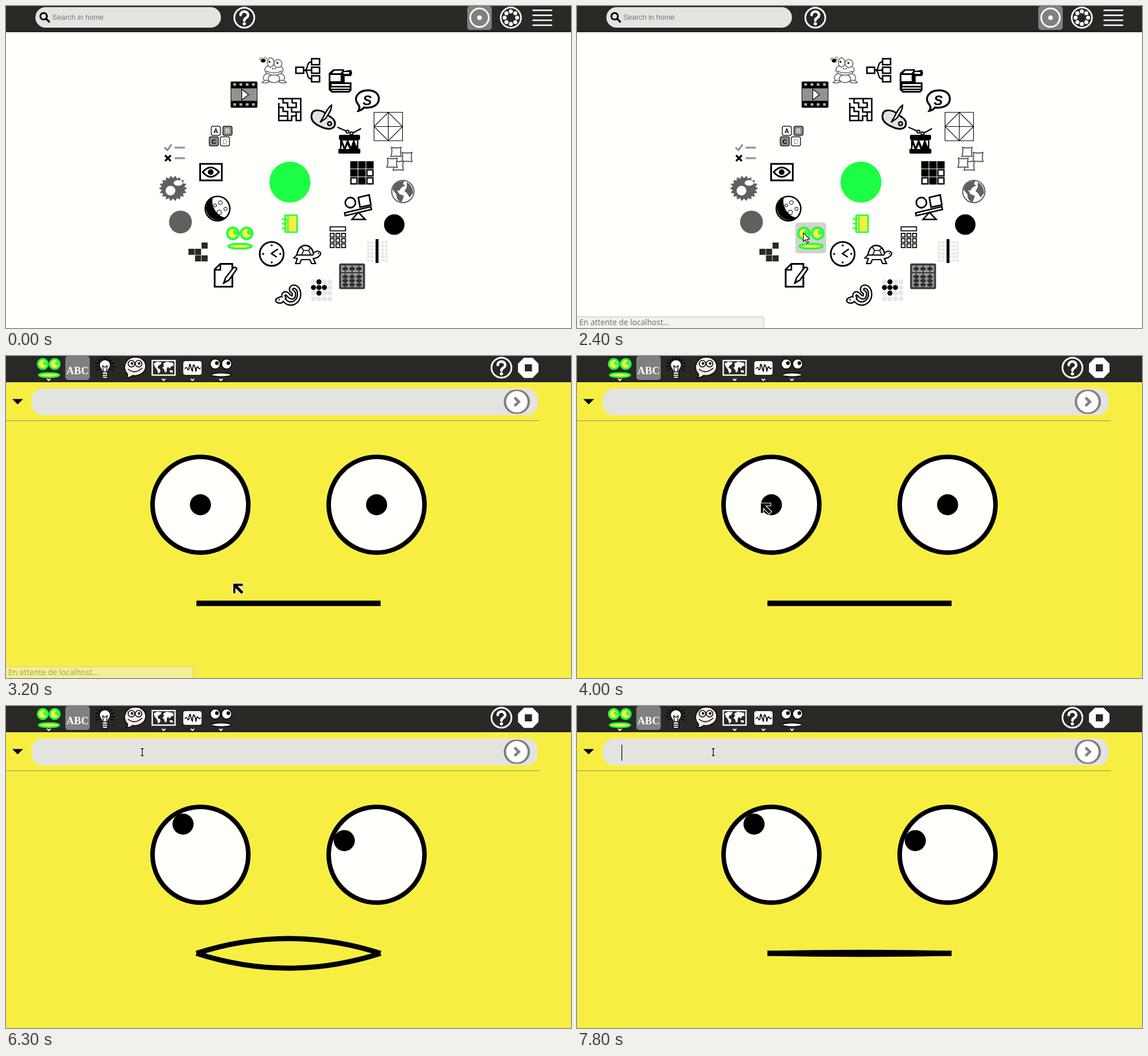
These frames come from a looping animation (991 px wide and 565 px high, 8 s). An HTML page:

```html
<!DOCTYPE html>
<html lang="en">
<head>
<meta charset="utf-8">
<title>Talking face</title>
<style>
html, body { margin: 0; width: 100%; height: 100%; overflow: hidden; background: #fffffc; }
svg { display: block; width: 991px; height: 565px; }
text { font-family: "Liberation Sans", Arial, sans-serif; }
</style>
</head>
<body>
<svg id="stage" viewBox="0 0 991 565" width="991" height="565"></svg>
<script>
const BAR = '#282824', PAPER = '#fffffc', GREY = '#808080', FIELD = '#e3e4e0';
const YELLOW = '#f8ee42', GREEN = '#1cff44', DIM = '#606060', FAINT = '#e8e8e6';

// Shape helpers: fill, stroke, stroke width
const ink = (f = 'none', s = 'none', w = 3) =>
  `fill="${f}" stroke="${s}" stroke-width="${w}"`;
const rect = (x, y, w, h, r, ...p) =>
  `<rect x="${x}" y="${y}" width="${w}" height="${h}" rx="${r}" ${ink(...p)}/>`;
const oval = (x, y, rx, ry, ...p) =>
  `<ellipse cx="${x}" cy="${y}" rx="${rx}" ry="${ry}" ${ink(...p)}/>`;
const disc = (x, y, r, ...p) => oval(x, y, r, r, ...p);
const path = (d, ...p) => `<path d="${d}" ${ink(...p)}/>`;
const line = (d, s = '#000', w = 3) =>
  `<path d="${d}" ${ink('none', s, w)} stroke-linecap="round" stroke-linejoin="round"/>`;
const text = (s, x, y, size, fill, extra = '') =>
  `<text x="${x}" y="${y}" font-size="${size}" fill="${fill}" ${extra}>${s}</text>`;
const group = (id, body, extra = '') => `<g id="${id}" ${extra}>${body}</g>`;
const move = (x, y, body, s = 1) =>
  `<g transform="translate(${x} ${y}) scale(${s})">${body}</g>`;
const repeat = (n, f) => Array.from({ length: n }, (_, i) => f(i)).join('');
const grid = (cols, rows, f) => repeat(rows, r => repeat(cols, c => f(c, r)));

const help = x => disc(x, 20.5, 17.5, 'none', '#fff', 3) + move(x, 20.5,
  line('M-6.5 -4.8a6.5 6 0 1 1 9.6 5.3c-2.2 1.2 -3.1 2.2 -3.1 4.6', '#fff', 4.6) +
  disc(0, 10.8, 2.8, '#fff'));

const face = (x, y, s, fill, edge) => move(x, y,
  [-12, 12].map(dx => disc(dx, -8, 10, fill, edge, 4) +
    disc(dx + 5, -10, 4.2, edge) + disc(dx + 6, -11, 1.3, fill)).join('') +
  oval(0.5, 14.5, 20.5, 4.2, fill, edge, 3.2), s);

function homeBar() {
  const dots = repeat(8, i => {
    const a = i * Math.PI / 4;
    return disc(885.5 + 11 * Math.cos(a), 20.5 + 11 * Math.sin(a), 3.5, '#fff');
  });
  return rect(0, 0, 991, 46, 0, BAR) + rect(0, 43, 991, 3, 0, '#262123') +
    rect(51.5, 2, 325.5, 36, 18, FIELD) +
    disc(66, 18, 5.8, 'none', '#000', 3) + line('M70.5 22.5L75.5 27.5', '#000', 3.4) +
    text('Search in home', 81, 24, 12.9, '#757575') + help(418) +
    rect(809, 0, 43, 42, 5, GREY) + disc(830.5, 20.5, 16.3, 'none', '#fff', 3) +
    disc(830.5, 20.5, 4, '#fff') + disc(885.5, 20.5, 17.8, 'none', '#fff', 2.8) + dots +
    line('M924.5 7.5H957M924.5 16.2H957M924.5 25H957M924.5 33.7H957', '#fff', 2.6);
}

function frog() {
  return disc(447.5, 93, 2.3, '#fff', '#444', 1) + disc(454.5, 92, 2.3, '#fff', '#444', 1) +
    oval(451, 96, 4, 3.2, '#000') +
    oval(470, 127.5, 10, 7, '#fff', DIM, 1.5) +
    path('M460 118c-9 2 -11 9 -6 13M480 118c9 2 11 9 6 13', 'none', DIM, 1.5) +
    path('M462 133c-4 -5 -10 -2 -13 1c4 2 9 1 13 -1zM478 133c4 -5 11 -2 14 1c-5 2 -10 1 -14 -1z', '#fff', DIM, 1.4) +
    oval(470, 112, 16, 9.5, '#fff', DIM, 1.5) +
    oval(464, 99, 5.8, 8.2, '#fff', DIM, 1.5) + disc(477, 101, 7, '#fff', DIM, 1.5) +
    disc(462, 98, 1.7, '#000') + disc(476, 100, 1.7, '#000') +
    disc(468, 110, 1.1, '#000') + disc(472, 110, 1.1, '#000') +
    path('M456 114q14 7 28 0', 'none', DIM, 1.4);
}

function topIcons() {
  const flow = rect(508.5, 107.5, 13.5, 10.5, 0, PAPER, '#000', 2.6) +
    [92.5, 107.5, 122.5].map(y => rect(536, y, 14, 10.5, 0, PAPER, '#000', 2.6)).join('') +
    path('M522 112.7H536M524 112.7C531 111 526 98 536 98M524 112.7C531 114 526 128 536 128', 'none', '#000', 2.4);
  const film = rect(394, 132.5, 47, 46, 2, '#000') +
    rect(394.5, 144, 46, 23, 0, '#929292', '#000', 1) +
    grid(4, 2, (c, r) => rect(398.5 + c * 11, 135.5 + r * 35, 5, 4.5, 1, '#aaa')) +
    path('M413.5 146V165L425.5 155.5Z', '#fff', '#000', 1.3);
  const books = path('M566 118L574 111H593V114L605 112Q609 118 605 123H594V134H606V148L602 152H571L566 147Z', '#000') +
    path('M569 121H587V132H569ZM576 113.5H590L587 118H572ZM592 116H602V119H592Z', '#fff') +
    path('M571 137H603V140H571ZM570 143H603V145H570ZM572 147.5H602V149H572Z', '#fff');
  const bubble = path('M618 184Q622 178 618 173C608 162 617 148 635 148C648 148 654 155 654 163C654 175 640 180 628 178Q624 183 618 184Z', PAPER, '#000', 3.4) +
    text('S', 633.5, 174, 24, '#000', 'text-anchor="middle" font-weight="bold" font-style="italic"');
  const maze = path('M477 162.5H517V201H509V193H501V201H478.5V170M478.5 193H494V185H486V178H478M486 162V170H494V178H509V170H501M502 162V170M517 186H501V178M509 193V186M494 186V201', 'none', '#000', 2.6);
  const palette = path('M536 191C538 179 554 183 560 188C566 194 578 197 577 207C576 218 562 217 553 212C543 208 534 201 536 191Z', '#e2e2e0', '#000', 3) +
    disc(567.5, 206.5, 3.2, PAPER, '#000', 2.6) +
    path('M571 174C566 177 559 189 557 194L551 204L561 197C565 190 572 182 571 174Z', PAPER, '#000', 2.4);
  const kite = path('M645.5 186.5H695.5V236.5H645.5ZM645.5 211.5H695.5M670.5 186.5V236.5M645.5 211.5L670.5 186.5L695.5 211.5L670.5 236.5Z', 'none', '#000', 1.1);
  const drum = rect(584, 226, 37, 9, 2, '#000') + rect(583, 250.5, 38.5, 8.5, 2, '#000') +
    path('M586 233H618V252H586Z', '#000') +
    path('M590 236H598L594 247ZM600.5 236H609L605 247ZM611 236H616L615 247ZM589 243L592 251H588ZM599 243L602.5 251H596Z', PAPER) +
    line('M582 213L598 220M622 215.5L608 223', '#000', 2.2) +
    disc(599, 220.5, 2.6, PAPER, '#000', 2) + disc(606, 223.5, 2.6, PAPER, '#000', 2);
  return frog() + flow + film + books + bubble + maze + palette + kite + drum;
}

function leftIcons() {
  const block = (ch, x, y, f, ink2, w) => rect(x, y, 16, 16, 3, f, '#222', 1.5) +
    text(ch, x + 8, y + 12, 11, ink2, `text-anchor="middle" font-weight="${w}"`);
  const letters = block('A', 360, 211, PAPER, '#000', 700) + block('B', 380.5, 211, '#8a8a8a', '#eee', 700) +
    block('C', 356.5, 229.5, '#8a8a8a', '#000', 700) + block('D', 376, 229.5, PAPER, '#888', 400);
  const list = path('M278 248L283 253L290.5 243', 'none', '#8a8a8a', 3) +
    line('M297 248.5H312.5M297 267H312.5', '#999', 3.4) +
    path('M279 262L289 272M289 262L279 272', 'none', '#000', 3.4);
  const eye = rect(340.5, 277, 38, 29, 0, PAPER, '#000', 3) +
    path('M345 291.5Q359 275 373.5 291.5Q359 308 345 291.5Z', PAPER, '#000', 2.8) + disc(359, 291.5, 5, '#000');
  const star = 'M' + Array.from({ length: 36 }, (_, i) => {
    const a = i * Math.PI / 18, r = i % 2 ? 0.8 : 1;
    return `${(293 + 25 * r * Math.cos(a)).toFixed(1)} ${(320 + 22.5 * r * Math.sin(a)).toFixed(1)}`;
  }).join('L') + 'Z';
  const burst = path(star, DIM) + oval(302, 310.5, 8, 5, PAPER) + disc(288.5, 324, 8.5, PAPER);
  const moon = disc(371, 355.5, 21.5, PAPER, '#000', 2.6) +
    path('M363 335A21.5 21.5 0 1 0 386 371C372 371 358 352 363 335Z', '#000') +
    disc(376, 345, 3.4, 'none', '#000', 1) + disc(385, 356, 3, 'none', '#000', 1) +
    disc(367, 350, 2.6, '#fff', '#000', 1) + disc(374, 362, 4, '#fff', '#000', 1);
  const bricks = [[343, 415], [320, 426], [331.5, 426], [331.5, 437.5], [343, 437.5]]
    .map(([x, y]) => rect(x, y, 10.7, 10.7, 0, BAR)).join('');
  const note = path('M366 462L376 452.5H397V492.5H366Z', PAPER, '#000', 3) +
    path('M376 452V463H366', 'none', '#000', 2.6) +
    path('M382 486L385 477L399 459Q404 457 404.5 462L391 481Z', PAPER, '#000', 2.6) + path('M381 488L383 481L388 484Z', '#000');
  return letters + list + eye + burst + moon + disc(306, 379, 20, DIM) + bricks + note;
}

function rightIcons() {
  const tiles = grid(3, 3, (c, r) => rect(605 + c * 14, 273.5 + r * 14, 10.6, 10.6, 0,
    'BBBBBWWBW'[r * 3 + c] === 'B' ? '#000' : PAPER, '#000', 2.4));
  const sheets = [[676, 248], [695, 257], [680, 272], [669, 267]].map(([x, y]) =>
    move(x, y, path('M0 0Q8 2 17 0Q15 8 17 16Q9 15 -1 16Q2 8 0 0Z', PAPER, DIM, 2))).join('');
  const globe = disc(696, 325.5, 19.5, PAPER, DIM, 2) +
    path('M681 314Q688 306 699 307L696 312L700 315L693 319L690 324L686 323L690 330L698 333L694 344Q684 341 685 331L678 322ZM703 309Q714 316 714 328L708 336L703 328L699 325L703 318Z', DIM);
  const scale = path('M594 363L640 352L641 357L595 368Z', PAPER, '#000', 2.6) +
    disc(604, 345, 9, PAPER, '#000', 2.8) +
    path('M618 336L637 331.5L640 349L621 353Z', PAPER, '#000', 2.8) + path('M618 362L607 374.5H630Z', PAPER, '#000', 2.6);
  const calc = rect(568.5, 387.5, 27, 7, 0, PAPER, '#000', 1.8) +
    grid(3, 3, (c, r) => rect(568.8 + c * 10, 399 + r * 9.2, 6.6, 6.4, 0, PAPER, '#000', 1.8));
  const bars = grid(6, 6, (c, r) => disc(635.5 + c * 6.3, 415 + r * 6.3, 2.6, FAINT)) + rect(648.3, 409, 5, 42, 0, '#000');
  const abacus = rect(586, 453.5, 42, 41.5, 1, '#999', '#3c3c3a', 3.5) +
    path('M587 468H628M595 454V494M607 454V494M619 454V494', 'none', '#3c3c3a', 1.8) +
    grid(3, 4, (c, r) => oval(595 + c * 12, [461, 475, 482, 489][r], 5, 3.1, '#30302e'));
  return tiles + sheets + globe + scale + disc(681, 383.5, 18, '#000') + calc + bars + abacus;
}

function lowIcons() {
  const journal = rect(489.5, 367, 21, 30, 1, YELLOW, GREEN, 2.6) +
    path('M494.5 367V397', 'none', GREEN, 2) + line('M484.5 374H491M484.5 382H491M484.5 390H491', GREEN, 2.4);
  const clock = disc(466, 435, 21, PAPER, '#000', 3) + line('M476 427L465.5 434.5L474 440', '#000', 2.6) +
    [[466, 420], [466, 450], [451, 435], [481, 435]].map(([x, y]) => disc(x, y, 1.8, '#000')).join('');
  const turtle = path('M510 438Q513 420 525 420Q538 421 540 438Z', PAPER, '#000', 2.4) +
    path('M518 423L522 429H531L534 424M522 429L518 438M531 429L535 438', 'none', '#000', 1.7) +
    path('M538 437Q541 430 547 430Q554 432 551 437Q546 443 539 443L543 452H536L533 445H518L515 452H508L511 443L505 442L510 437Z', PAPER, '#000', 2.2) +
    disc(548, 434, 1.2, '#000');
  const curl = 'M478 516C484 508 488 518 494 521C505 525 515 516 514 504C513 490 499 490 500 498C501 503 506 500 505 507C504 514 499 512 494 506C489 501 484 507 488 512';
  const snake = line(curl, '#000', 8) + oval(480, 516.5, 7, 4.8, PAPER, '#000', 2.4) +
    line(curl, PAPER, 3.4) + disc(479, 515.5, 1.2, '#000');
  const on = [1, 4, 5, 6, 9];
  const dots = grid(4, 4, (c, r) => disc(539.3 + c * 9.6, 484 + r * 9.9, 4.5,
    on.includes(r * 4 + c) ? '#000' : FAINT));
  return journal + clock + turtle + snake + dots;
}

const home = () => rect(0, 0, 991, 565, 0, PAPER) + homeBar() +
  rect(0, 0, 54, 54, 5, '#d2d2ce').replace('<rect', '<rect id="hover"') +
  topIcons() + leftIcons() + rightIcons() + lowIcons() +
  disc(498, 309, 36, GREEN) + face(410, 407, 1, YELLOW, GREEN);

function appBar() {
  const rays = repeat(11, i => {
    const a = (150 + i * 24) * Math.PI / 180, c = Math.cos(a), s = Math.sin(a);
    return line(`M${173.5 + 12 * c} ${17 + 12 * s}L${173.5 + 17 * c} ${17 + 16 * s}`, '#000', 1.5);
  });
  const bulb = rays + path('M169 28C169 23 164 22 164 16A9.5 9.5 0 0 1 183 16C183 22 178 23 178 28Z', '#fff', '#000', 1.4) +
    path('M171 28L169.5 17L173.5 20L177.5 17L176 28', 'none', '#000', 1.3) +
    rect(168.5, 28, 10, 11, 3, '#fff', '#000', 1.2) + path('M169 32H178M169 35.5H178', 'none', '#000', 1.4);
  const chat = path('M211 38Q215 34 212 30C203 20 210 2 227 2C238 2 245 9 245 18C245 30 232 36 222 34Q217 38 211 38Z', '#fbebe8', '#000', 1.6) +
    [220, 232.5].map(x => disc(x, 13.5, 5.7, '#fff', '#000', 1.6) + disc(x + 1, 13, 2.3, '#000')).join('') +
    path('M214 23Q226 33 239 21', 'none', '#000', 1.6);
  const map = rect(256.5, 8, 40, 25.5, 0, BAR, '#fff', 2.4) +
    path('M259 13L265 10L273 11L271 15L267 17L266 21L270 23L271 27L267 31L265 24L261 19ZM276 13L282 10L293 12L294 17L290 18L287 22L284 19L282 22L282 27L279 29L277 23L274 21L277 18ZM287 25L292 25L293 29L288 29Z', '#fff');
  const wave = rect(311, 9, 32, 24, 4, '#fff') +
    line('M314 22Q317 18 318 22T321 23Q322 9 324 18T327 27Q328 13 330 16T333 27Q335 16 337 20T341 21', '#000', 1.7);
  return rect(0, 0, 991, 46, 0, BAR) + rect(0, 43, 991, 3, 0, '#262123') +
    group('plain', face(75, 21, 0.87, '#fff', '#000')) + group('vivid', face(75, 21, 0.87, YELLOW, GREEN) +
      [75, 276.5, 327, 377].map(x => line(`M${x - 2.5} 40.5L${x} 43L${x + 2.5} 40.5`, '#fff', 1.8)).join('')) +
    rect(104, 0, 43, 42, 5, GREY) +
    text('ABC', 125.5, 32, 18.5, '#fff', 'text-anchor="middle" font-weight="bold" style="font-family:\'Liberation Serif\',serif"') +
    bulb + chat + map + wave +
    [367, 387].map(x => disc(x, 14, 8.8, '#fff', '#000', 1.6) + disc(x + 3, 12.5, 3.2, '#000')).join('') +
    oval(377.5, 33, 17, 3.2, '#fff', '#000', 1.4) + help(869) +
    path('M908.5 3H923.5L934 13.5V28L923.5 38.5H908.5L898 28V13.5Z', '#fff') + rect(910, 14.5, 12.5, 12.5, 0, BAR);
}

const app = () => rect(0, 0, 991, 565, 0, '#c0c0bc').replace('<rect', '<rect id="back"') + appBar() +
  path('M11 75.5H30L20.5 85Z', '#000') + rect(45, 57, 887.5, 47, 20, FIELD) +
  rect(873, 59, 46, 42.5, 21, GREY) + disc(896, 80.3, 18.8, '#fff') +
  path('M892 73L899.5 80.3L892 87.5', 'none', GREY, 4.6) +
  rect(0, 113, 936, 1, 0, '#8c8c84') + group('shine', rect(0, 114, 936, 1, 0, '#f4f4f0')) +
  group('caret', rect(78, 68, 1.2, 28, 0, '#000')) +
  group('head', [341, 650].map(x => disc(x, 261, 84, PAPER, '#000', 8)).join('') +
    group('pupilL', disc(0, 0, 18.5, '#000')) + group('pupilR', disc(0, 0, 18.5, '#000')) +
    group('lips', path('', 'none', '#000', 9) + path('', 'none', '#000', 9)));

document.getElementById('stage').innerHTML = group('home', home()) + group('app', app()) +
  group('status', path('M-1 566V545.5H325Q328 545.5 328 548.5V566Z', '#f0f0ec', '#b4b4b0', 1) +
    text('En attente de localhost…', 4, 560, 13.7, '#5c5c5a', 'style="font-family:\'Noto Sans\',\'Open Sans\',sans-serif"')) +
  group('pointer', path('M0 0V15L3.6 12L6.3 18L9 17L6.4 11.2H11Z', '#fff', '#000', 1.1)) +
  group('arrow', path('M1 1H19V6H10.5L20.5 16L16 20.5L6 10.5V19H1Z', '#000', '#fff', 1.2)) +
  group('beam', line('M-2 -6.3H2M0 -6.3V6.3M-2 6.3H2', '#fff', 3) + path('M-2.5 -6.3H2.5M0 -6.3V6.3M-2.5 6.3H2.5', 'none', '#000', 1.4));

const el = {};
document.querySelectorAll('[id]').forEach(e => el[e.id] = e);
const show = (id, on) => el[id].setAttribute('visibility', on ? 'inherit' : 'hidden');
const place = (id, x, y) => el[id].setAttribute('transform', `translate(${x} ${y})`);

const LOOP = 8000, OPEN = 2800, READY = 3100, LOOK = 4200;
// time, x, y
const mouse = [[0, -50, -50], [1400, 229, 187], [1500, 266, 258], [1600, 311, 326],
  [1900, 348, 354], [2000, 385, 384], [2100, 410, 404], [2300, 403, 400], [2400, 397, 398],
  [3600, 400, 408], [3700, 405, 386], [3800, 405, 357], [4000, 321, 257],
  [4200, 300, 211], [4300, 264, 133], [4400, 239, 81]];
// mouth opening every 100 ms, from TALK on
const TALK = 4500;
const voice = [6, 18, 27, 22, 12, 24, 27, 9, 19.5, 25, 12, 4, 4, 15, 24, 8, 20, 27, 26, 13, 21, 7, 7,
  28.5, 28.5, 14, 5, 5, 17, 24, 11, 20, 9, 1.8, 1.8];

const latest = (keys, t) => keys.filter(k => k[0] <= t).pop();

function pupil(id, cx, t, x, y) {
  const cy = 261, dx = x - cx, dy = y - cy;
  const k = t < LOOK ? 0 : Math.min(1, 61.8 / Math.hypot(dx, dy));
  place(id, cx + dx * k, cy + dy * k);
}

function draw(t) {
  const [, x, y] = latest(mouse, t), inApp = t >= OPEN, ready = t >= READY;
  show('home', !inApp);
  show('app', inApp);

  const overStar = t >= 1600 && t < 1900, overFace = t >= 2000;
  show('hover', !inApp && (overStar || overFace));
  place('hover', overStar ? 266 : 383, overStar ? 293 : 380);

  const glow = t < 2300 ? 0 : t < 2400 ? 0.4 : t < OPEN ? 0.85 : t < 3200 ? 1 : t < 3300 ? 0.5 : 0;
  el.status.setAttribute('opacity', glow);

  const typing = inApp && y > 57 && y < 104;
  show('pointer', !inApp);
  show('arrow', inApp && !typing);
  show('beam', typing);
  for (const id of ['pointer', 'arrow', 'beam']) place(id, x, y);

  el.back.setAttribute('fill', ready ? YELLOW : '#c0c0bc');
  show('plain', inApp && !ready);
  show('shine', inApp && !ready);
  show('vivid', ready);
  show('head', ready);
  show('caret', (t >= 5800 && t < 6100) || (t >= 6600 && t < 7100) || t >= 7600);

  pupil('pupilL', 341, t, x, y);
  pupil('pupilR', 650, t, x, y);
  const open = voice[Math.floor((t - TALK) / 100)] || 0;
  [-2, 2].forEach((k, i) => el.lips.children[i].setAttribute('d',
    `M334 434Q495.5 ${434 + k * open} 657 434`));
}

const start = performance.now();
function tick() {
  draw((performance.now() - start) % LOOP);
  requestAnimationFrame(tick);
}
tick();
</script>
</body>
</html>
```
